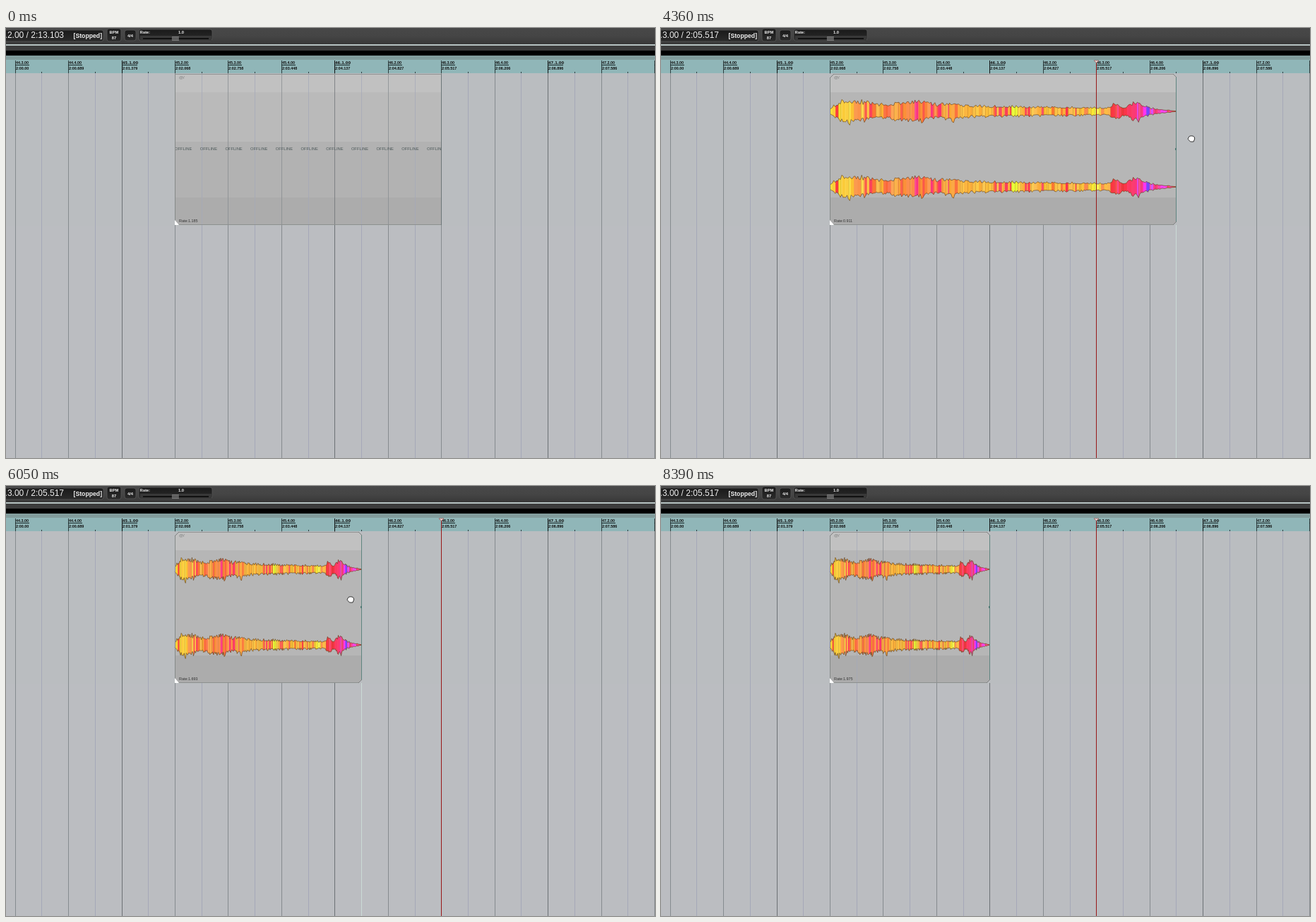
These frames come from a looping animation (919 by 609 pixels, 8.66 s). An HTML page with a canvas:

```html
<!DOCTYPE html>
<html lang="en">
<head>
<meta charset="utf-8">
<title>Stretching an audio item</title>
<style>
html, body { margin: 0; width: 100%; height: 100%; overflow: hidden; background: #bbbdc1; }
canvas { display: block; }
</style>
</head>
<body>
<canvas id="stage" width="919" height="609"></canvas>
<script>
const g = document.getElementById('stage').getContext('2d');
const W = 919, H = 609, LOOP = 8660, STEP = 89.05;
const ORIGIN = 12.7, BEAT = 75.44, HALF = BEAT / 2;
const LEFT = 239, TOP = 65, BOTTOM = 279, PLAYHEAD = 616;
const SANS = '"Liberation Sans", Arial, sans-serif', WIDE = '"DejaVu Sans", sans-serif';
const WAKE = 360, HOVER = 1150, GRAB = 3740, DROP = 7850, LEAVE = 8390;

// Places where the pointer rests or turns: [time, x, y]
const stops = [
  [WAKE, 560, 232], [HOVER, 622, 187], [1330, 622, 187], [1590, 615, 173.5],
  [2120, 615, 173.5], [2300, 615, 167], [2930, 615, 167], [3470, 613, 157],
  [GRAB, 613, 157], [4630, 789, 157], [4990, 789, 157], [5080, 755, 157],
  [6050, 488, 161], [6410, 488, 161], [6840, 738, 161], [7490, 458, 162],
  [DROP, 458, 162], [LEAVE, 895, 166]
];

const random = n => { const s = Math.sin(n * 127.1 + 3.7) * 43758.5453; return s - Math.floor(s); };
const bump = (u, center, width) => Math.exp(-(((u - center) / width) ** 2));
const gridX = half => Math.round(ORIGIN + HALF * half);

function pointer(t) {
  const i = Math.max(1, stops.findIndex(s => s[0] > t));
  const [t1, x1, y1] = stops[i - 1], [t2, x2, y2] = stops[i];
  const f = Math.max(0, (t - t1) / (t2 - t1)), e = f * f * (3 - 2 * f);
  return [x1 + (x2 - x1) * e, y1 + (y2 - y1) * e];
}

// Item length in half beats: the edge snaps to the grid just behind the pointer
function itemLength(t) {
  const [x] = pointer(Math.max(GRAB, Math.min(DROP, t) - STEP / 2));
  return Math.round((x + 3 - LEFT) / HALF);
}

function loudness(u) {
  const body = 10 - 6 * u + 6 * bump(u, .06, .05) + 6 * bump(u, .24, .055) +
    5 * bump(u, .355, .025) + 6 * bump(u, .825, .015) + 8 * bump(u, .887, .025);
  return body * Math.min(1, .35 + u * 22) * Math.min(1, .1 + (1 - u) * 13);
}

function hue(u) {
  if (u > .805) return -6 - 24 * bump(u, .91, .04) - 80 * bump(u, .913, .007);
  return 38 + 8 * bump(u, .03, .08) - 16 * bump(u, .25, .09) +
    36 * bump(u, .53, .008) + 26 * bump(u, .765, .012);
}

function box(x, y, w, h, color) { g.fillStyle = color; g.fillRect(x, y, w, h); }
function vline(x, y1, y2, color) { box(x, y1, 1, y2 - y1, color); }

function text(s, x, y, size, color, align = 'left', weight = 'normal', font = SANS) {
  g.font = `${weight} ${size}px ${font}`;
  g.textAlign = align;
  g.fillStyle = color;
  g.fillText(s, x, y);
}

function shape(points, fill, stroke, width = 1) {
  g.beginPath();
  points.forEach(p => g.lineTo(...p));
  if (fill) { g.closePath(); g.fillStyle = fill; g.fill(); }
  if (stroke) { g.strokeStyle = stroke; g.lineWidth = width; g.stroke(); }
}

function gradient(y, h, ...colors) {
  const fill = g.createLinearGradient(0, y, 0, y + h);
  colors.forEach((c, i) => fill.addColorStop(i / (colors.length - 1), c));
  return fill;
}

function panel(x, y, w, h) {
  g.beginPath();
  g.roundRect(x, y, w, h, 3);
  g.fillStyle = gradient(y, h, '#1a1a1a', '#2b2b2b');
  g.fill();
  g.strokeStyle = '#575757';
  g.lineWidth = .8;
  g.stroke();
}

function toolbar(awake) {
  const label = (s, x, y, align = 'center') => text(s, x, y, 5.8, '#eee', align, 'bold');
  box(0, 0, W, 23, gradient(0, 23, '#484848', '#454545', '#383838'));
  box(0, 23, W, 2, '#b6c3c2');
  box(0, 25, W, 7, '#3c3c3c');
  box(0, 32, W, 7, '#000');
  panel(-10, 3, 148, 16);
  text(awake ? '6.3.00 / 2:05.517' : '9.2.00 / 2:13.103', 82, 14, 12, '#eee', 'right');
  text('[Stopped]', 95.5, 14, 8.7, '#eee', 'left', 'bold');
  panel(143, 1, 20, 18);
  label('BPM', 153, 8);
  label('87', 153, 16);
  panel(168, 3, 16, 15);
  label('4/4', 176, 13);
  panel(188, 2, 104, 16);
  label('Rate:', 189.5, 8, 'left');
  label('1.0', 248, 8);
  box(190, 11, 101, 7, '#383838');
  box(194, 14, 93, 2, '#111');
  box(235, 12, 10, 6, '#777');
  for (let x = 236; x < 245; x += 2) vline(x, 13, 17, '#444');
}

function ruler() {
  box(0, 39, W, 6, '#829c9c');
  box(0, 45, W, 19, '#90b6b8');
  for (let i = 0; i <= 12; i++) {
    const x = gridX(2 * i), beat = i + 2, bar = beat % 4 === 0;
    const seconds = Math.floor(i * 60000 / 87) / 1000;
    vline(x, 46, 64, bar ? '#111' : '#2e3c3d');
    vline(gridX(2 * i + 1), 62, 64, '#2e3c3d');
    text(`${44 + (beat >> 2)}.${beat % 4 + 1}.00`, x + 1, 51.3, bar ? 5.2 : 5.4, '#111',
      'left', 'bold', bar ? WIDE : SANS);
    box(x, 52, bar ? 22 : 20, 1, '#162526');
    text('2:0' + seconds.toFixed(i ? 3 : 2), x + 1, 58.6, 5.4, '#111', 'left', 'bold');
  }
}

function grid(y1, y2, x1 = 0, x2 = W) {
  for (let i = 0; i <= 24; i++) {
    const x = gridX(i);
    if (x >= x1 && x <= x2) vline(x, y1, y2, i % 2 ? '#a5a8b8' : i % 8 === 4 ? '#6c7175' : '#868b8f');
  }
}

function wave(cy, width) {
  const N = 260, edge = [];
  for (const side of [-1, 1]) {
    for (let i = 0; i <= N; i++) {
      const k = side < 0 ? i : N - i, u = k / N;
      const spike = .74 + .52 * random(k + side * 900) ** 2;
      edge.push([LEFT + u * width, cy + side * loudness(u) * spike]);
    }
  }
  g.save();
  shape(edge, '#fa4');
  g.clip();
  for (let u = 0, i = 1; u < 1; i++) {
    const step = .003 + .008 * random(i), r = random(i + 500);
    const shift = r < .12 ? -46 : r < .3 ? -18 : 14 * r - 7;
    const x = LEFT + u * width;
    box(x, cy - 22, step * width + .5, 44, `hsl(${hue(u) + shift}, 96%, ${59 + 7 * random(i + 80)}%)`);
    if (r > .6) box(x, cy - 22, .6, 44, 'rgba(120,60,30,.35)');
    u += step;
  }
  g.restore();
  shape(edge, null, 'rgba(85,58,32,.75)', .8);
}

function corner(x, y, dx, dy) {
  shape([[x, y], [x + dx, y], [x, y + dy]], '#b9bcbf');
  shape([[x + dx, y], [x, y + dy]], null, '#707372', .8);
}

function item(right, length, awake, dragging) {
  const width = right - LEFT;
  box(LEFT, TOP, width, 26, '#c1c1c1');
  box(LEFT, 91, width, 149, awake ? '#b6b6b6' : '#bababa');
  if (!awake) box(LEFT, 161, width, 79, '#b2b2b2');
  box(LEFT, 240, width, 39, '#acacac');
  if (!dragging) {
    g.globalAlpha = .75;
    grid(TOP, BOTTOM, LEFT, right);
    g.globalAlpha = 1;
  }
  if (awake) {
    wave(118, width);
    wave(225, width);
  } else {
    g.save();
    g.beginPath();
    g.rect(LEFT, TOP, width, BOTTOM - TOP);
    g.clip();
    for (let i = 0; i < 11; i++) text('OFFLINE', LEFT + 35.7 * i, 173, 5.75, '#4b5758');
    g.restore();
  }
  box(LEFT, TOP, width, 1, '#919392');
  box(LEFT, BOTTOM - 1, width, 1, '#8d908f');
  vline(LEFT, TOP, BOTTOM, '#858988');
  vline(right, TOP, BOTTOM, awake ? '#5f8580' : '#6d7779');
  if (awake) {
    corner(LEFT, TOP, 6, 6);
    corner(right + 1, TOP, -5, 5);
    corner(right + 1, BOTTOM, -5, -5);
  }
  shape([[LEFT, 272], [LEFT + 6, BOTTOM], [LEFT, BOTTOM]], '#fff');
  text('@/', 245, 71.5, 6, '#7b7d7d');
  text('Rate:' + (11.848 / length).toFixed(3), 245, 275, 5.4, '#333');
}

function arrow(x, y) {
  shape([[x, y - 6], [x, y + 6], [x + 3, y + 3.5], [x + 5, y + 8], [x + 7, y + 7],
    [x + 5, y + 2.5], [x + 8.5, y + 2.5], [x, y - 6]], '#fff', '#111', .9);
}

function resizer(x, y) {
  for (const s of [-1, 1])
    shape([[x + s * 1.2, y - 4], [x + s * 6.5, y], [x + s * 1.2, y + 4], [x + s * 1.2, y - 4]],
      '#fff', '#111', 1.1);
}

function fist(x, y) {
  shape([[x - 3, y - 3.5], [x - 1, y - 4.2], [x + 2, y - 4], [x + 4.2, y - 2.5], [x + 4.6, y],
    [x + 3, y + 4], [x - 1.5, y + 4], [x - 4.8, y + .5], [x - 4.5, y - 1], [x - 3, y - 3.5]],
    '#fff', '#222', .9);
}

function draw(t) {
  const awake = t >= WAKE, dragging = t >= GRAB && t < DROP;
  const now = Math.floor((t + 15) / STEP) * STEP;
  const length = itemLength(now), right = gridX(6 + length);
  box(0, 64, W, 217, '#babdc0');
  box(0, 281, W, H - 281, '#bbbdc1');
  grid(64, H);
  toolbar(awake);
  ruler();
  item(right, length, awake, dragging);
  if (t >= GRAB) box(right - 1, 170, 2, 3, '#527b76');
  if (awake) {
    vline(PLAYHEAD, 46, H, '#981818');
    shape([[613, 46], [620, 46], [616.5, 49.5]], '#ecd5d2', '#8f3a3a', .6);
  }
  if (dragging) {
    if (right === PLAYHEAD) vline(right, TOP, H, '#a16561');
    else vline(right, BOTTOM, H, '#cadbd6');
  }
  if (awake && t < LEAVE) {
    const cursor = dragging ? fist : t >= HOVER && t < GRAB ? resizer : arrow;
    cursor(...pointer(now));
  }
}

function frame() {
  draw(performance.now() % LOOP);
  requestAnimationFrame(frame);
}
frame();
</script>
</body>
</html>
```
